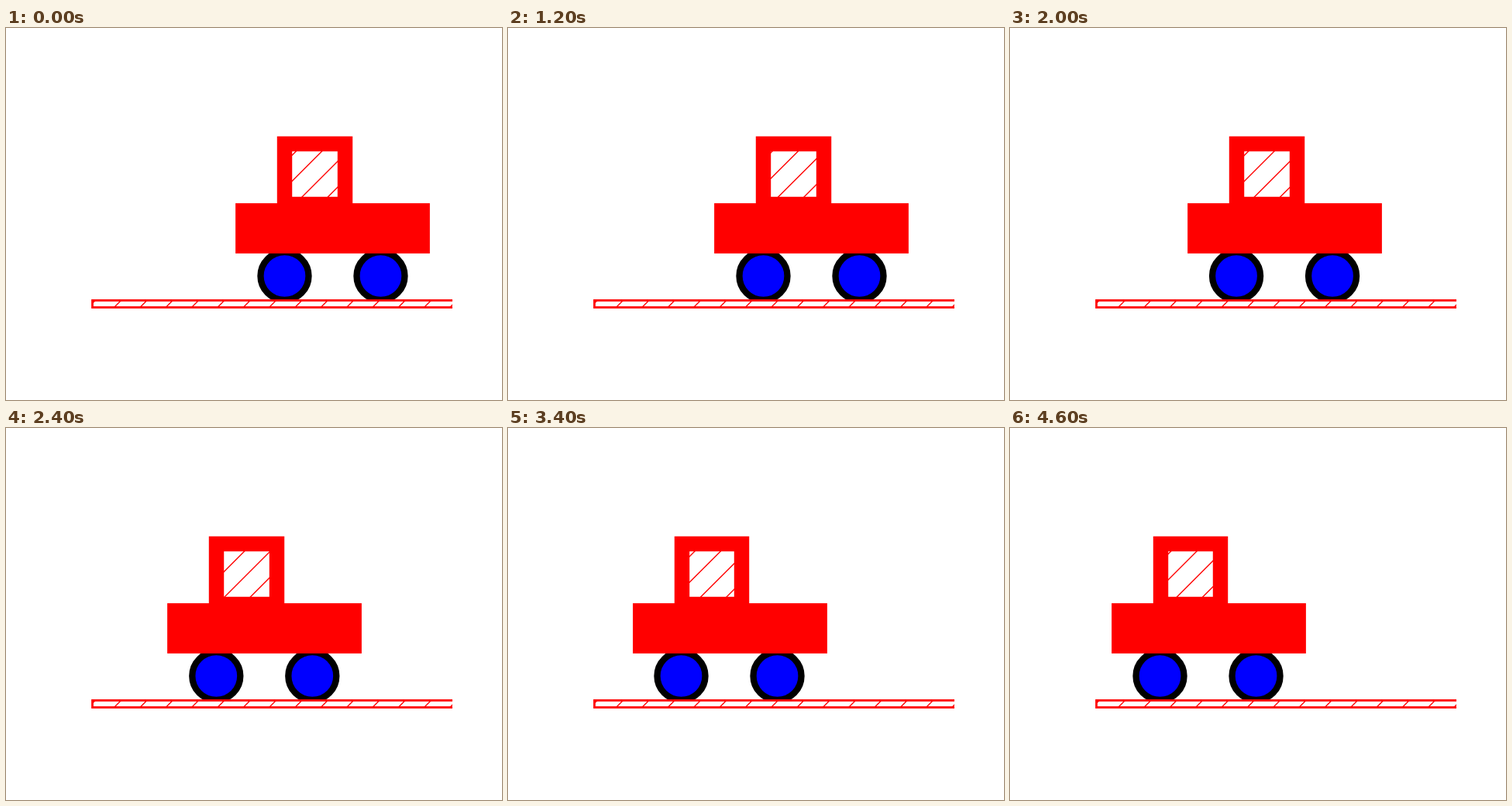
An HTML page with a canvas for the animation above (5000 ms loop, 640 by 480 pixels).

```html
<!DOCTYPE html>
<html lang="en">
<head>
<meta charset="utf-8">
<title>Toy truck</title>
<style>
html, body { margin: 0; width: 100%; height: 100%; overflow: hidden; background: #fff; }
canvas { display: block; }
</style>
</head>
<body>
<canvas id="stage" width="640" height="480"></canvas>
<script>
const ctx = document.getElementById('stage').getContext('2d');
const RED = '#f00';
const LOOP = 5000, STEP = 200, LAST = 23;
const THIN = 2.78, FRAME = 19.44, TYRE = 8.33;
const HATCH_GAP = 100 / 3, HATCH_WIDTH = 1.39;

// Straight edges sit on pixel centres.
const snap = v => Math.floor(v + 0.5) + 0.5;

// The truck swings from right to left, slowing at both ends.
const truckX = step => 214.5 - 83.78 * Math.sin(0.1245 * (step - LAST / 2));

// Diagonals are anchored to the stage, so a moving box slides over them.
function hatch(x, y, w, h) {
  ctx.save();
  ctx.beginPath();
  ctx.rect(x, y, w, h);
  ctx.clip();
  ctx.beginPath();
  const end = Math.ceil((x + w + y + h) / HATCH_GAP);
  for (let i = Math.floor((x + y) / HATCH_GAP); i <= end; i++) {
    const sum = i * HATCH_GAP;
    ctx.moveTo(sum - y + 5, y - 5);
    ctx.lineTo(sum - y - h - 5, y + h + 5);
  }
  ctx.strokeStyle = RED;
  ctx.lineWidth = HATCH_WIDTH;
  ctx.stroke();
  ctx.restore();
}

function box(left, top, right, bottom, width, fill) {
  const w = right - left, h = bottom - top;
  ctx.fillStyle = fill;
  ctx.fillRect(left, top, w, h);
  if (fill !== RED) hatch(left, top, w, h);
  ctx.strokeStyle = RED;
  ctx.lineWidth = width;
  ctx.strokeRect(left, top, w, h);
}

function wheel(x) {
  ctx.beginPath();
  ctx.arc(x, 320, 31, 0, Math.PI * 2);
  ctx.fillStyle = '#00f';
  ctx.fill();
  ctx.strokeStyle = '#000';
  ctx.lineWidth = TYRE;
  ctx.stroke();
}

function road() {
  ctx.save();
  ctx.beginPath();
  ctx.rect(80, 0, 496, 480);
  ctx.clip();
  box(111.5, 351.5, 607.5, 360.5, THIN, '#fff');
  ctx.restore();
}

function draw(step) {
  const x = truckX(step);
  ctx.fillStyle = '#fff';
  ctx.fillRect(0, 0, 640, 480);
  wheel(x + 62);
  wheel(x + 186);
  box(snap(x + 62), 149.5, snap(x + 139.5), 227.5, FRAME, '#fff');
  box(snap(x), 227.5, snap(x) + 248, 289.5, THIN, RED);
  road();
}

function tick() {
  const time = performance.now() % LOOP;
  draw(Math.min(LAST, Math.floor(time / STEP)));
  requestAnimationFrame(tick);
}
tick();
</script>
</body>
</html>
```
